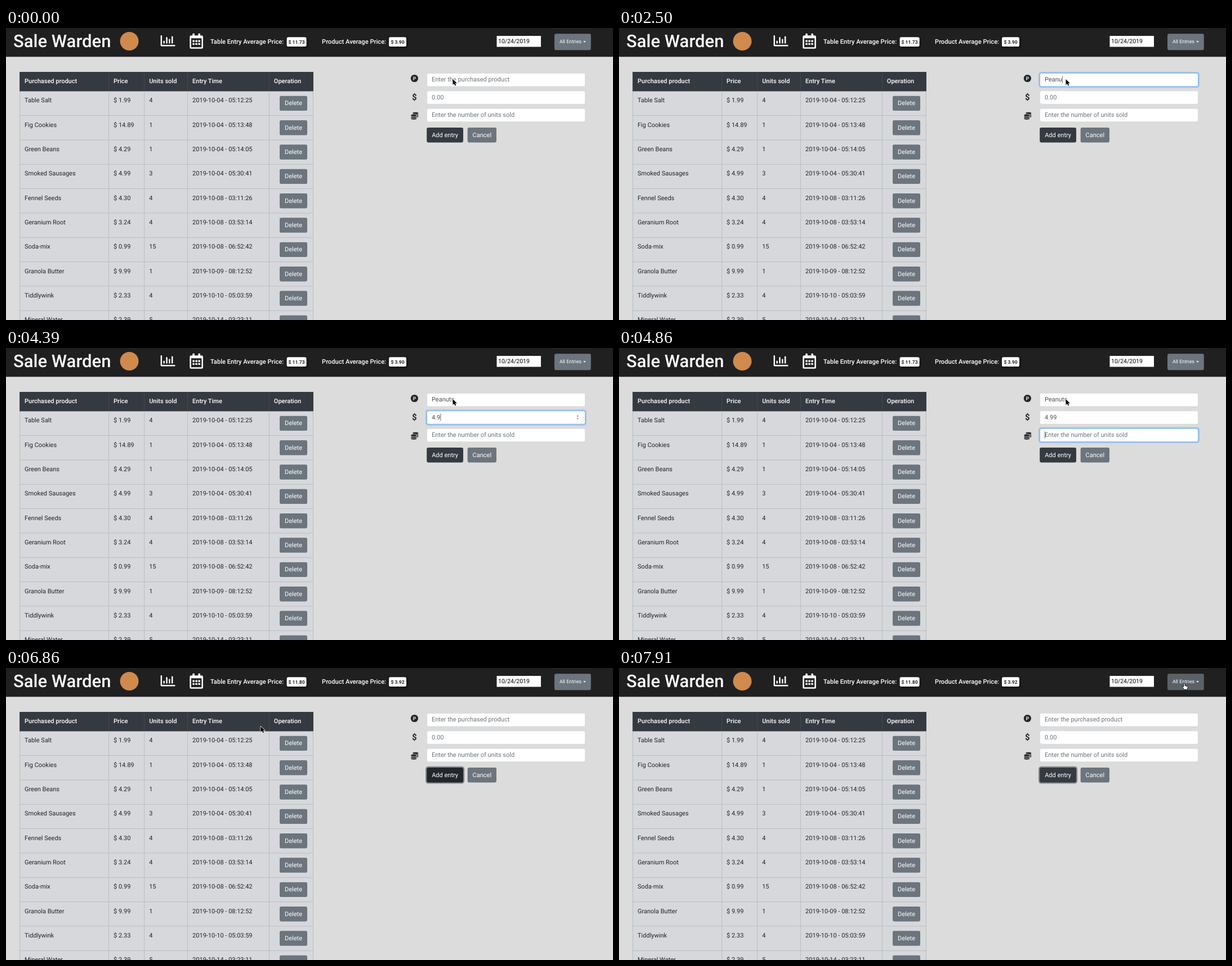
An HTML page that plays this animation: 1078 by 519 pixels, repeating every 8 s.

```html
<!DOCTYPE html>
<html lang="en">
<head>
<meta charset="utf-8">
<title>Sale Warden</title>
<style>
  html, body { margin: 0; width: 100%; height: 100%; overflow: hidden; background: #dcdcdc; }
  svg { display: block; width: 1078px; height: 519px; }
  text { font-family: Roboto, sans-serif; white-space: pre; text-rendering: geometricPrecision; }
  .badge { filter: drop-shadow(1px 2px 2px rgba(0, 0, 0, .7)); }
</style>
</head>
<body>
<svg viewBox="0 0 1078 519"><g id="page"></g><g id="live"></g></svg>
<script>
const LOOP = 8000, TICK = 118;
const DARK = '#343a40', GREY = '#6c757d', INK = '#212529', BAR = '#202020', LINE = '#b3b7bb';

const rect = (x, y, w, h, fill, r = 0, extra = '') =>
  `<rect x="${x}" y="${y}" width="${w}" height="${h}" rx="${r}" fill="${fill}" ${extra}/>`;
const text = (x, y, str, fill = INK, size = 11, weight = 400, anchor = 'start') =>
  `<text x="${x}" y="${y}" fill="${fill}" font-size="${size}" font-weight="${weight}" text-anchor="${anchor}">${str}</text>`;
const path = (d, fill, extra = '') => `<path d="${d}" fill="${fill}" ${extra}/>`;
const button = (x, y, w, label, fill) =>
  rect(x, y, w, 26.4, fill, 2.8) + text(x + w / 2, y + 16.7, label, '#fff', 11, 400, 'middle');
const range = (count, make) => Array.from({ length: count }, (_, i) => make(i)).join('');
const clamp = v => Math.min(1, Math.max(0, v));

// Table
const TOP = 112, ROW = 43.33, LEFT = 24.5, RIGHT = 545.5, PAD = 8.5;
const columns = { 'Purchased product': 33, 'Price': 191, 'Units sold': 254.2, 'Entry Time': 331.1, 'Operation': 475.8 };
const products = [
  'Table Salt|$ 1.99|4|2019-10-04 - 05:12:25',
  'Fig Cookies|$ 14.89|1|2019-10-04 - 05:13:48',
  'Green Beans|$ 4.29|1|2019-10-04 - 05:14:05',
  'Smoked Sausages|$ 4.99|3|2019-10-04 - 05:30:41',
  'Fennel Seeds|$ 4.30|4|2019-10-08 - 03:11:26',
  'Geranium Root|$ 3.24|4|2019-10-08 - 03:53:14',
  'Soda-mix|$ 0.99|15|2019-10-08 - 06:52:42',
  'Granola Butter|$ 9.99|1|2019-10-09 - 08:12:52',
  'Tiddlywink|$ 2.33|4|2019-10-10 - 05:03:59',
  'Mineral Water|$ 2.39|5|2019-10-14 - 03:23:11'
];

function table() {
  const starts = Object.values(columns), width = RIGHT - LEFT + 1;
  const edges = [...starts.map(x => x - PAD), RIGHT];
  const rules = (y, h, color) => edges.map(x => rect(x - .4, y, .8, h, color)).join('');
  const row = (line, i) => {
    const y = TOP + ROW * i;
    return rect(LEFT - .5, y - .1, width, .8, LINE)
      + line.split('|').map((cell, c) => text(starts[c], y + 20.4, cell)).join('')
      + button(486, y + 8.7, 49, 'Delete', GREY);
  };
  return rect(LEFT - .5, TOP, width, 410, '#d6d8db') + rules(TOP, 410, LINE) + products.map(row).join('')
    + rect(LEFT - .5, 78, width, 34.4, DARK) + rules(78, 34, '#454d55')
    + Object.entries(columns).map(([label, x]) => text(x, 98.3, label, '#fff', 11, 500)).join('');
}

// Icons
const chartIcon = () => `<g transform="translate(274.6 9.8) scale(.0505)">`
  + path('M16 64H32Q48 64 48 80V400H496Q512 400 512 416V432Q512 448 496 448H32Q0 448 0 416V80Q0 64 16 64Z', '#fff')
  + [96, 224, 160, 256].map((h, i) => rect(96 * (i + 1), 352 - h, 48, h, '#fff', 12)).join('') + '</g>';

const calendarIcon = () => `<g transform="translate(326.3 9.8) scale(.0527)">`
  + rect(0, 64, 448, 448, '#fff', 48) + rect(48, 160, 352, 304, BAR, 6)
  + range(2, i => rect(96 + 192 * i, 0, 64, 90, '#fff', 12))
  + range(6, i => rect(96 + 96 * (i % 3), 224 + 96 * Math.floor(i / 3), 64, 64, '#fff', 12)) + '</g>';

const coinStack = (x, y) => range(3, i =>
  `<ellipse cx="${x}" cy="${y - 2.8 * i}" rx="5.2" ry="2.3" fill="${INK}" stroke="#dcdcdc" stroke-width=".8"/>`);

const header = () => rect(0, 0, 1078, 51.2, BAR)
  + text(13, 34, 'Sale Warden', '#fff', 31, 500)
  + '<circle cx="219" cy="23.5" r="16.5" fill="#d08a4e"/>'
  + chartIcon() + calendarIcon()
  + text(363, 27.5, 'Table Entry Average Price:', '#fff', 11.15, 500)
  + text(561, 27.5, 'Product Average Price:', '#fff', 11.15, 500)
  + rect(871.5, 14, 78.5, 19.5, '#fff') + text(874, 27.3, '10/24/2019', '#000', 10.5);

const formIcons = () => `<circle cx="725.4" cy="89.5" r="6.6" fill="${INK}"/>`
  + text(725.5, 92.6, 'P', '#dcdcdc', 9, 700, 'middle') + text(725.2, 128.2, '$', INK, 15, 700, 'middle')
  + coinStack(727.3, 157.2) + coinStack(724.2, 160.8);

document.getElementById('page').innerHTML =
  header() + table() + formIcons() + button(819.7, 177, 51.3, 'Cancel', GREY);

// Form: all times below are in ticks
const CLICK = 54, KEY_RATE = 1.5, BLINK = 580 / TICK;
const fields = [
  { hint: 'Enter the purchased product', focus: 1, blur: 25, bursts: [[17, 'Pean'], [21, 'uts']] },
  { hint: '0.00', focus: 25, blur: 40, bursts: [[32, '4.'], [37, '99']], spinner: true },
  { hint: 'Enter the number of units sold', focus: 40, blur: CLICK, bursts: [[44, '3']] }
];
const ramp = (n, start) => clamp((n - start + 1) / 2);

const typedText = (f, n) => n >= CLICK ? '' : f.bursts
  .map(([start, keys]) => keys.slice(0, Math.max(0, Math.floor((n - start + 1) * KEY_RATE)))).join('');

// The caret restarts its blink with every key
function caretOn(f, n) {
  if (n < f.focus || n >= f.blur) return false;
  const presses = f.bursts.filter(([start]) => start <= n)
    .map(([start, keys]) => Math.min(n, start + Math.ceil(keys.length / KEY_RATE) - 1));
  return Math.floor((n - Math.max(f.focus, ...presses)) / BLINK) % 2 === 0;
}

const pen = document.createElement('canvas').getContext('2d');
function textWidth(str) {
  pen.font = '11px Roboto, sans-serif';
  return pen.measureText(str).width;
}

function field(f, i, n) {
  const x = 747.5, y = 80.4 + 31.4 * i, w = 281, h = 23.5;
  const glow = ramp(n, f.focus) - ramp(n, f.blur), typed = typedText(f, n);
  let s = rect(x - 2.4, y - 2.4, w + 4.8, h + 4.8, '#007bff', 5, `fill-opacity="${.28 * glow}"`)
    + rect(x, y, w, h, '#fff', 2.8, 'stroke="#ced4da" stroke-width=".7"')
    + rect(x, y, w, h, 'none', 2.8, `stroke="#80bdff" stroke-opacity="${glow}"`)
    + text(756, y + 14.9, typed || f.hint, typed ? '#495057' : GREY);
  if (f.spinner && glow > .4)
    s += path(`M1013.4 ${y + 10}l1.8 -2.2l1.8 2.2zM1013.4 ${y + 13}l1.8 2.2l1.8 -2.2z`, '#777');
  if (caretOn(f, n)) s += rect(756.2 + textWidth(typed), y + 4.8, .8, 13, '#495057');
  return s;
}

// Pointer: curved moves between resting points
const smooth = p => p * p * (3 - 2 * p);
const speedUp = p => p ** 1.8;
const rest = [793.5, 91], addSpot = [790.5, 195.5], turn = [389, 38], menuSpot = [1004, 27];
const moves = [
  { start: 46, end: 52, from: rest, bend: [830, 260], to: addSpot, ease: smooth },
  { start: CLICK, end: 60, from: addSpot, bend: [300, 85], to: turn, ease: speedUp },
  { start: 60, end: 67, from: turn, bend: [700, 30], to: menuSpot, ease: smooth }
];
const addBox = { x: 747.2, y: 177, w: 64.8, h: 26.4 };
const menuBox = { x: 974, y: 10.2, w: 64.8, h: 29 };
const inside = ([x, y], b) => x > b.x && x < b.x + b.w && y > b.y && y < b.y + b.h;

function pointerAt(n) {
  const m = moves.findLast(move => n >= move.start) || moves[0];
  const u = m.ease(clamp((n - m.start) / (m.end - m.start))), v = 1 - u;
  return m.from.map((a, k) => v * v * a + 2 * u * v * m.bend[k] + u * u * m.to[k]);
}

function cursor([x, y], hand) {
  const shape = hand
    ? path('M-1.2 .8Q0 -1 1.2 .8V4.5L5.4 5.6Q6.4 6 6.2 7.6L5.2 11.4H-.2L-3.4 7.2Q-3.8 5.8 -2.4 6L-1.2 6.8Z',
      '#fff', 'stroke="#000" stroke-width=".9"')
    : path('M0 0V10.2L2.4 8L4 11.6L5.8 10.8L4.2 7.3H7.4Z', '#000',
      'stroke="#fff" stroke-width="1.4" stroke-linejoin="round" paint-order="stroke"');
  return `<g transform="translate(${x} ${y})">${shape}</g>`;
}

const badge = (x, w, label) => `<g class="badge">${rect(x, 16.2, w, 16.8, '#fff', 2.8)}</g>`
  + text(x + w / 2, 27.5, label, INK, 8.5, 700, 'middle');

function scene(n) {
  const added = n > CLICK, spot = pointerAt(n);
  const onAdd = inside(spot, addBox), onMenu = inside(spot, menuBox);
  const pressed = n >= CLICK - 1 && n <= 60;
  return badge(498.6, 35, added ? '$ 11.80' : '$ 11.73') + badge(680, 31, added ? '$ 3.92' : '$ 3.90')
    + rect(menuBox.x, menuBox.y, menuBox.w, menuBox.h, onMenu ? '#5a6268' : GREY, 2.8)
    + text(983, 27.3, 'All Entries', '#fff', 8.75) + path('M1025 23.2h5l-2.5 2.6z', '#fff')
    + fields.map((f, i) => field(f, i, n)).join('')
    + rect(addBox.x - 2.2, addBox.y - 2.2, addBox.w + 4.4, addBox.h + 4.4, DARK, 5, `fill-opacity="${.5 * ramp(n, CLICK)}"`)
    + button(addBox.x, addBox.y, addBox.w, 'Add entry', pressed ? '#23272b' : DARK)
    + cursor(spot, onAdd || onMenu);
}

const live = document.getElementById('live');
let shown = -1;
function draw() {
  const n = Math.floor(performance.now() % LOOP / TICK);
  if (n !== shown) live.innerHTML = scene(shown = n);
  requestAnimationFrame(draw);
}
draw();
</script>
</body>
</html>
```
